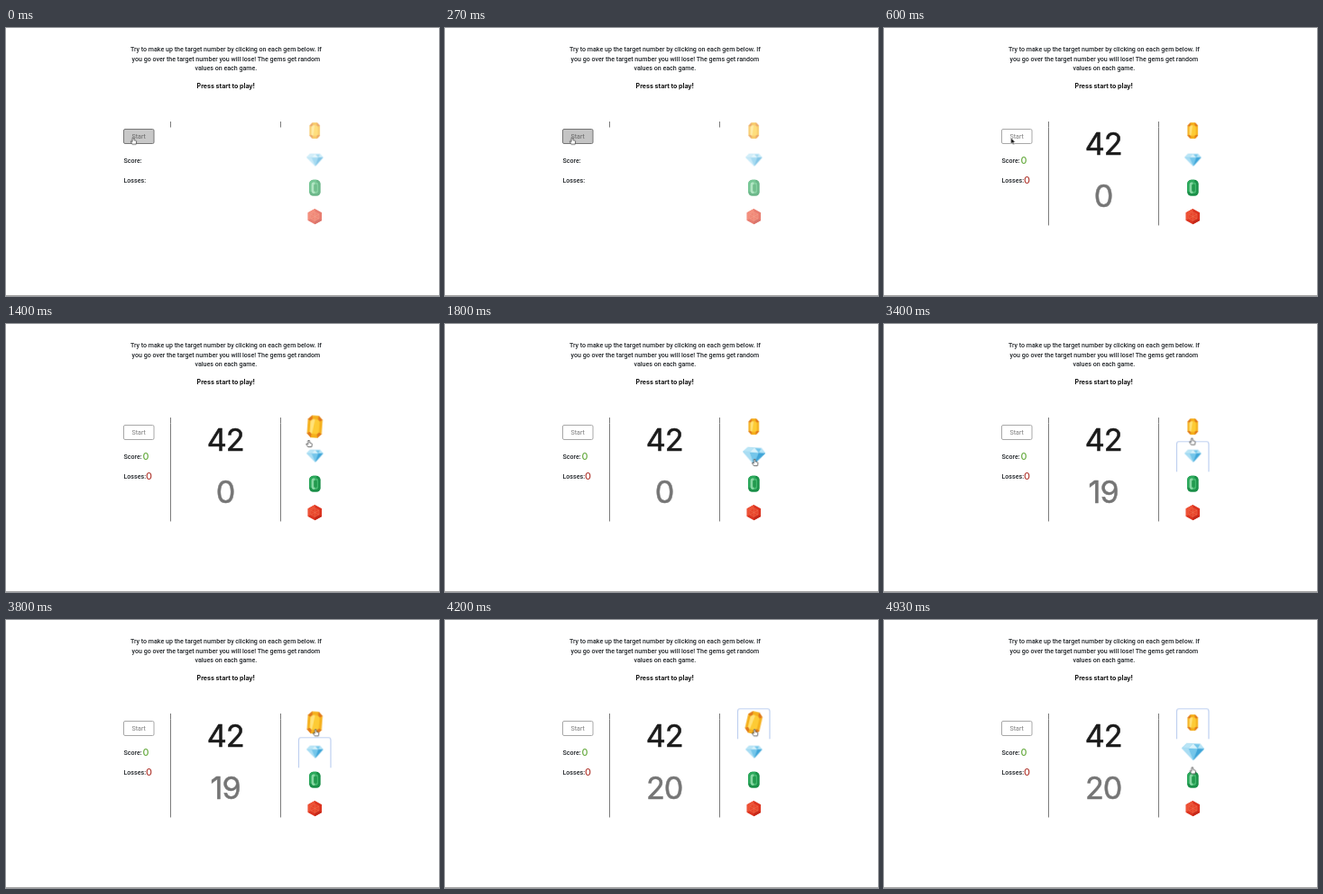
Animation, 480 px wide and 298 px high, one loop 4.99 s. Source, as an HTML page:

```html
<!DOCTYPE html>
<html lang="en">
<head>
<meta charset="utf-8">
<title>Gem game</title>
<style>
  html, body { margin: 0; width: 100%; height: 100%; overflow: hidden; background: #fff; }
  svg { display: block; width: 480px; height: 298px; }
  text { font: 500 7.08px Roboto, "Open Sans", sans-serif; fill: #212529; }
  .mid { text-anchor: middle; }
  .title { font: 700 7.06px Inter, sans-serif; fill: #111; }
  .label { font-weight: 400; }
  .big {
    font: 34.2px Inter, sans-serif; letter-spacing: -.9px; text-anchor: middle;
    fill: #757575; stroke: #757575; stroke-width: .5; stroke-linejoin: round;
  }
  .goal { fill: #1b1b1b; stroke: #1b1b1b; }
  .tally { font: 500 10.8px Inter, sans-serif; }
  .rule { stroke: #7c7c7c; }
  .focus { fill: none; stroke: #bfd0f0; stroke-width: 1.2; }

  .run, .run * { animation: 4990ms linear infinite; }

  /* Hard switches */
  .run .started { animation-name: started; animation-timing-function: step-end; }
  .run .zero { animation-name: zero; animation-timing-function: step-end; }
  .run .nineteen { animation-name: nineteen; animation-timing-function: step-end; }
  .run .twenty { animation-name: twenty; animation-timing-function: step-end; }
  .run .hand { animation-name: hand; animation-timing-function: step-end; }
  .run .arrow { animation-name: arrow; animation-timing-function: step-end; }
  @keyframes started { 0% { opacity: 0 } 6.8%, 100% { opacity: 1 } }
  @keyframes zero { 0% { opacity: 0 } 6.8% { opacity: 1 } 39.5%, 100% { opacity: 0 } }
  @keyframes nineteen { 0% { opacity: 0 } 39.5% { opacity: 1 } 77.5%, 100% { opacity: 0 } }
  @keyframes twenty { 0% { opacity: 0 } 77.5%, 100% { opacity: 1 } }
  @keyframes hand { 0% { opacity: 1 } 6.8% { opacity: 0 } 22.7%, 100% { opacity: 1 } }
  @keyframes arrow { 0% { opacity: 0 } 6.8% { opacity: 1 } 22.7%, 100% { opacity: 0 } }

  /* Start button */
  .run .button { animation-name: button; }
  .run .label { animation-name: label; }
  .run .ring { animation-name: ring; }
  @keyframes button {
    0%, 1.4% { fill: #c8c8c8; stroke: #777 }
    2.6%, 5.4% { fill: #c4c4c4; stroke: #757575 }
    11%, 100% { fill: #fff; stroke: #a8a8a8 }
  }
  @keyframes label { 0%, 5.4% { fill: #666 } 11%, 100% { fill: #7b7b7b } }
  @keyframes ring { 0%, 5.4% { opacity: 0 } 7% { opacity: .35 } 11%, 100% { opacity: 0 } }

  /* Gems */
  .run .gems { animation-name: wake; }
  .run .amber { animation-name: amber; }
  .run .diamond { animation-name: diamond; }
  .run .focus-diamond { animation-name: focus-diamond; }
  .run .focus-amber { animation-name: focus-amber; }
  @keyframes wake { 0%, 5.4% { opacity: .64 } 11.5%, 100% { opacity: 1 } }
  @keyframes amber {
    0%, 21.5% { transform: none }
    24%, 28.8% { transform: scale(1.4) rotate(4deg) }
    32%, 68.5% { transform: none }
    72%, 76.2% { transform: scale(1.4) rotate(4deg) }
    80%, 93.6% { transform: scale(1.4) rotate(13deg) }
    97.6%, 100% { transform: none }
  }
  @keyframes diamond {
    0%, 29.5% { transform: none }
    33%, 38.7% { transform: scale(1.36) rotate(4deg) }
    42%, 65.5% { transform: scale(1.36) rotate(14deg) }
    68%, 94.5% { transform: none }
    97%, 100% { transform: scale(1.36) rotate(2deg) }
  }
  @keyframes focus-diamond { 0%, 38.7% { opacity: 0 } 41.5%, 76.2% { opacity: 1 } 78%, 100% { opacity: 0 } }
  @keyframes focus-amber { 0%, 76.2% { opacity: 0 } 79%, 100% { opacity: 1 } }

  /* Pointer path */
  .run .pointer { animation-name: pointer; }
  @keyframes pointer {
    0%, 5.4% { transform: translate(141px, 121.6px) }
    6.8%, 15.9% { transform: translate(140.6px, 122px) }
    17.4% { transform: translate(190px, 118px) }
    18.7% { transform: translate(250px, 108px) }
    20% { transform: translate(300px, 99px) }
    21.4% { transform: translate(332px, 95px) }
    22.7% { transform: translate(341px, 108px) }
    24%, 27.9% { transform: translate(342px, 116px) }
    28.06%, 29.4% { transform: translate(335.6px, 129px) }
    30.8% { transform: translate(338.5px, 149px) }
    32.2% { transform: translate(341.5px, 168px) }
    33.4% { transform: translate(342px, 173px) }
    35% { transform: translate(343px, 158px) }
    37.4%, 57.4% { transform: translate(343.6px, 140.4px) }
    60.1%, 65.5% { transform: translate(342.4px, 140px) }
    68.1%, 69.4% { transform: translate(341.4px, 126.6px) }
    72% { transform: translate(342.5px, 119px) }
    74.7%, 93.5% { transform: translate(343.2px, 121.3px) }
    95% { transform: translate(342px, 135px) }
    97% { transform: translate(341.6px, 153px) }
    98.75%, 100% { transform: translate(341.8px, 163.4px) }
  }
</style>
</head>
<body>
<svg class="run" viewBox="0 0 480 298">
  <defs>
    <path id="focus" d="M324.5 34V3q0-2.5 2.5-2.5h30.5q2.5 0 2.5 2.5v31"/>
  </defs>

  <g class="mid">
    <text x="243.9" y="26.4">Try to make up the target number by clicking on each gem below. If</text>
    <text x="243.9" y="36.6">you go over the target number you will lose! The gems get random</text>
    <text x="243.9" y="46.8">values on each game.</text>
    <text class="title" x="243.8" y="67">Press start to play!</text>
  </g>

  <rect class="ring" x="128.8" y="111" width="37" height="19.2" rx="3" fill="none" stroke="#999" stroke-width="3"/>
  <rect class="button" x="130.5" y="112.5" width="33.5" height="16" rx="1.5"/>
  <text class="label mid" x="147.2" y="122.9">Start</text>
  <text x="130.5" y="150.4">Score:</text>
  <text x="130.5" y="172.4">Losses:</text>
  <g class="started">
    <text class="tally" x="151.5" y="150.8" style="fill:#64a93c">0</text>
    <text class="tally" x="155" y="172.6" style="fill:#b23c34">0</text>
  </g>

  <path class="rule" d="M182.5 104v6.5M304.5 104v6.5"/>
  <path class="rule started" d="M182.5 110.5v109M304.5 110.5v109"/>
  <text class="big goal started" x="243.2" y="141.2">42</text>
  <text class="big zero" x="243.2" y="199.2">0</text>
  <text class="big nineteen" x="243.2" y="199.2">19</text>
  <text class="big twenty" x="243.2" y="199.2">20</text>

  <use class="focus focus-amber" href="#focus" y="98.3"/>
  <use class="focus focus-diamond" href="#focus" y="130.3"/>

  <g class="gems">
    <g transform="translate(342.3 114.1)">
      <g class="amber">
        <path fill="#f5b01c" d="M-2.6-8.9h5.2L5.8-5.6V5.6L2.6 8.9h-5.2l-3.2-3.3V-5.6z"/>
        <path fill="#e07a1d" d="M-2.6-8.9l.5 3.1-1.5 1.6-2.2-1.4zM2.6 8.9l-.5-3.1 1.5-1.6 2.2 1.4zM2.6-8.9l-.5 3.1 1.5 1.6 2.2-1.4zM-2.6 8.9l.5-3.1-1.5-1.6-2.2 1.4z"/>
        <path fill="#fdcb35" d="M-2.1-5.8h4.2l1.5 1.6v8.4L2.1 5.8h-4.2l-1.5-1.6v-8.4z"/>
        <path fill="#ffe27a" d="M-2.1-5.8h2L-1.9 5.8h-.2l-1.5-1.6v-8.4z"/>
      </g>
    </g>
    <g transform="translate(342.4 146.6)">
      <g class="diamond">
        <path fill="#74c6ea" d="M-5.5-6.6H5.8l3.4 3.8L.5 7-9.2-2.8z"/>
        <path fill="#b9e5f6" d="M-5.5-6.6h5.6l-3.8 3.8h-5.5zM5.8-6.6l-2 3.8h5.4z"/>
        <path fill="#dbf3fb" d="M.1-6.6l3.7 3.8h-7.5z"/>
        <path fill="#a9ddf3" d="M-9.2-2.8h5.5L.5 7z"/>
        <path fill="#3fa5d8" d="M3.8-2.8h5.4L.5 7z"/>
      </g>
    </g>
    <g transform="translate(342.4 177.8)">
      <rect fill="#1a8f48" x="-6.3" y="-9" width="12.6" height="18" rx="4.6"/>
      <path fill="#2ba95b" d="M-1.7-9h3.4l.2 2.8h-3.8l-1.9 2v8.4l-2.5.2v-8.8q0-3.6 4.6-4.6z"/>
      <rect fill="#42b86d" x="-3.8" y="-6.2" width="7.6" height="12.4" rx="2.4"/>
      <path fill="#86d6a2" d="M-1.6-6.2h1.5v12.4h-1.5q-2.2-.4-2.2-2.4v-7.6q0-2 2.2-2.4z"/>
      <rect fill="#239a4f" x="-1.2" y="-4" width="3.6" height="8" rx="1.2"/>
    </g>
    <g transform="translate(342.4 209.6)">
      <path fill="#dc3420" d="M0-8.6l7.7 4.3v8.6L0 8.6l-7.7-4.3v-8.6z"/>
      <path fill="#ee5236" d="M0-8.6V-5l-4.6 2.5-3.1-1.8zM-7.7 4.3l3.1-1.8v-5l-3.1-1.8z"/>
      <path fill="#c62819" d="M0 8.6V5l4.6-2.5 3.1 1.8z"/>
      <path fill="#e8452b" d="M0-5l4.6 2.5v5L0 5l-4.6-2.5v-5z"/>
      <path fill="none" stroke="#f07a58" stroke-width=".4" d="M0-5V5M-4.6-2.5l9.2 5M4.6-2.5l-9.2 5M0-5l4.6 2.5v5L0 5l-4.6-2.5v-5z"/>
    </g>
  </g>

  <path stroke="#a5a5a5" d="M0 297.5h480"/>

  <g class="pointer">
    <path class="hand" fill="#fff" stroke="#333" stroke-width=".7" stroke-linejoin="round"
      d="M-.9.8q.9-1.4 1.8 0V3l2 .6q.9.3.8 1.3l-.6 2.8H-.9L-2.7 4.9q-.1-1 .8-.8l1 .8z"/>
    <path class="arrow" fill="#111" stroke="#fff" stroke-width=".5"
      d="M0 0v6.8l1.6-1.4 1.1 2.4 1.1-.5-1-2.3h2z"/>
  </g>
</svg>
</body>
</html>
```
